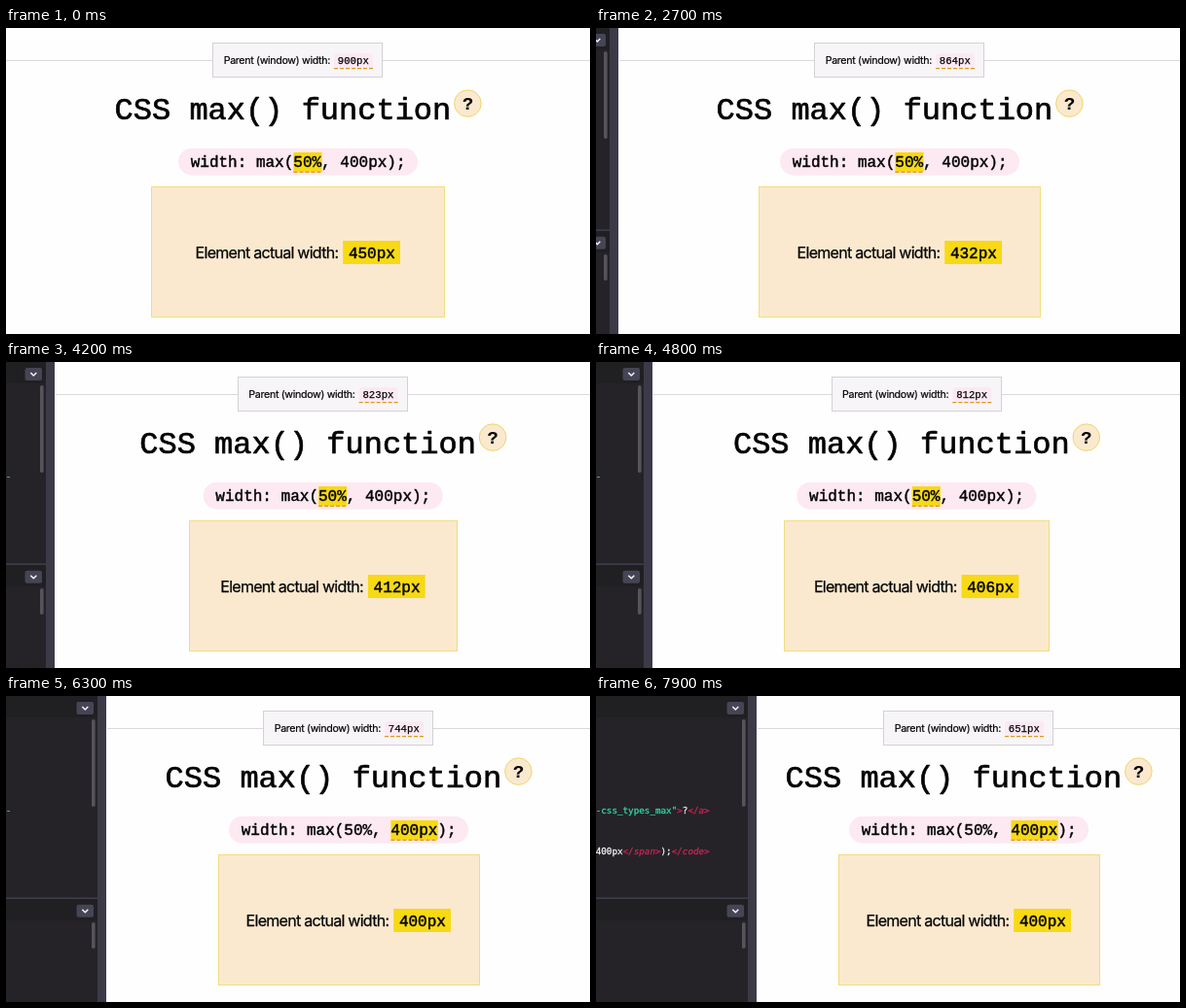
An HTML page with a canvas for the animation above (8 s loop, 600 by 315 pixels).

```html
<!DOCTYPE html>
<html lang="en">
<head>
<meta charset="utf-8">
<title>CSS max() function</title>
<style>
html, body { margin: 0; width: 100%; height: 100%; overflow: hidden; background: #fffeff; }
canvas { display: block; width: 600px; height: 315px; }
</style>
</head>
<body>
<canvas id="stage"></canvas>
<script>
const W = 600, H = 315, LOOP = 8000, STEP = 100;
const MONO = '"Liberation Mono", monospace';
const SANS = 'Inter, sans-serif';
const CODE = '"DejaVu Sans Mono", monospace';
const INK = '#050505';
const YELLOW = '#f7d914', CREAM = '#fbe9cf', PINK = '#fde9f2', DASH = '#d99a1c';
const PANEL = '#252327', HEADER = '#201f22', GUTTER = '#3d3a48', THUMB = '#56545b';
const RED = '#cc2453', GREEN = '#2fd8a0', WHITE = '#f2f2f4';

// Parent width in CSS pixels while the splitter is dragged: [time, width]
const drag = [
  [1300, 900], [2200, 874], [2700, 864], [3100, 850], [3600, 840],
  [4000, 827], [4800, 812], [4900, 808], [5700, 775], [5800, 768],
  [6700, 724], [6900, 713], [7600, 670], [7900, 651]
];

const canvas = document.getElementById('stage');
const ctx = canvas.getContext('2d');
const dpr = window.devicePixelRatio || 1;
canvas.width = W * dpr;
canvas.height = H * dpr;

function parentWidth(t) {
  if (t <= drag[0][0]) return drag[0][1];
  for (let i = 1; i < drag.length; i++) {
    const [t0, w0] = drag[i - 1], [t1, w1] = drag[i];
    if (t <= t1) return Math.round(w0 + (w1 - w0) * (t - t0) / (t1 - t0));
  }
  return drag[drag.length - 1][1];
}

function rect(x, y, w, h, fill) {
  ctx.fillStyle = fill;
  ctx.fillRect(x, y, w, h);
}

function framed(x, y, w, h, fill, edge) {
  x = Math.round(x);
  w = Math.round(w);
  rect(x, y, w, h, edge);
  rect(x + 1, y + 1, w - 2, h - 2, fill);
}

function round(x, y, w, h, r, fill) {
  ctx.fillStyle = fill;
  ctx.beginPath();
  ctx.roundRect(x, y, w, h, r);
  ctx.fill();
}

// weight: extra outline that thickens the strokes
function text(str, x, y, font, weight, fill = INK, spacing = 0) {
  ctx.font = font;
  ctx.letterSpacing = spacing + 'px';
  ctx.fillStyle = ctx.strokeStyle = fill;
  ctx.lineWidth = weight;
  ctx.lineJoin = 'round';
  ctx.fillText(str, x, y);
  ctx.strokeText(str, x, y);
  ctx.letterSpacing = '0px';
}

function dashes(x, y, w) {
  ctx.strokeStyle = DASH;
  ctx.lineWidth = 1.33;
  ctx.setLineDash([4, 2]);
  ctx.beginPath();
  ctx.moveTo(x, y);
  ctx.lineTo(x + w, y);
  ctx.stroke();
  ctx.setLineDash([]);
}

function page(width, edge) {
  const mid = 300 + edge / 2;
  const at = x => mid - 300 + x;
  const actual = Math.max(width / 2, 400);

  rect(edge, 33, W - edge, 1, '#dad8db');
  framed(at(212.4), 15, 175.2, 36, '#f7f5f8', '#d3d1d5');
  text('Parent (window) width:', at(223.7), 37.2, '10.67px ' + SANS, 0.2, INK, -0.32);
  round(at(337), 26, 40, 15.5, 4, PINK);
  text(width + 'px', at(340.8), 37.1, '10.67px ' + MONO, 0.25);
  dashes(at(337), 41.7, 40);

  text('CSS max() function', at(111.6), 94, '32px ' + MONO, 0.7);
  ctx.beginPath();
  ctx.arc(at(474.4), 77.6, 13.8, 0, Math.PI * 2);
  ctx.fillStyle = CREAM;
  ctx.fill();
  ctx.strokeStyle = '#efd668';
  ctx.lineWidth = 1;
  ctx.stroke();
  text('?', at(468.9), 84, 'bold 18.6px ' + MONO, 0.1);

  round(at(177), 123.7, 246, 28, 14, PINK);
  const [first, count] = width > 800 ? [11, 3] : [16, 5];
  const markX = at(189.8) + first * 9.6;
  rect(markX, 128, count * 9.6 + 0.4, 20.3, YELLOW);
  dashes(markX, 148.4, count * 9.6);
  text('width: max(50%, 400px);', at(189.7), 143.4, '16px ' + MONO, 0.45);

  const boxW = actual / 1.5 + 2;
  framed(mid - boxW / 2, 163, boxW, 135, CREAM, '#efde80');
  text('Element actual width:', at(194.6), 236.8, '16px ' + SANS, 0.25, INK, -0.72);
  rect(at(346.2), 219, 58.8, 24, YELLOW);
  text(Math.round(actual) + 'px', at(351.9), 236.8, '16px ' + MONO, 0.45);
}

function codeLine(y, parts) {
  let x = -0.3;
  for (const [str, fill, style = ''] of parts) {
    text(str, x, y, style + ' 9.25px ' + CODE, 0.3, fill);
    x += str.length * 5.57;
  }
}

function foldButton(edge, y) {
  round(edge - 30.5, y, 17.5, 13, 2, '#464556');
  ctx.strokeStyle = '#f4f4f6';
  ctx.lineWidth = 1.5;
  ctx.beginPath();
  ctx.moveTo(edge - 24.7, y + 5);
  ctx.lineTo(edge - 21.7, y + 8);
  ctx.lineTo(edge - 18.7, y + 5);
  ctx.stroke();
}

function pane(edge, top, thumbY, thumbH) {
  rect(0, top, edge, 22, HEADER);
  foldButton(edge, top + 6);
  round(edge - 15, thumbY, 3.6, thumbH, 1.8, THUMB);
}

function editor(edge) {
  const right = Math.floor(edge - 0.5);
  if (right <= 0) return;
  ctx.save();
  ctx.beginPath();
  ctx.rect(0, 0, right, H);
  ctx.clip();
  rect(0, 0, right, H, PANEL);
  pane(right, 0, 24, 90);
  pane(right, 208.7, 233, 27);
  rect(0, 207.3, right, 1.7, GUTTER);
  rect(right - 9, 0, 9, H, GUTTER);

  // Wrapped code: a chunk returns to its line once there is room for it
  const link = [];
  if (edge >= 35) link.push(['-', GREEN]);
  if (edge >= 126) link.push(['css_types_max"', GREEN], ['>', RED], ['?', WHITE]);
  if (edge >= 156) link.push(['</', RED], ['a', RED, 'italic'], ['>', RED]);
  codeLine(121.3, link);

  const value = [];
  if (edge >= 108) value.push(['400px', WHITE], ['</', RED], ['span', RED, 'italic'], ['>', RED], [');', WHITE]);
  if (edge >= 148) value.push(['</', RED], ['code', RED, 'italic'], ['>', RED]);
  codeLine(163.4, value);
  ctx.restore();
}

function draw(now) {
  const t = Math.floor((now % LOOP) / STEP) * STEP;
  const width = parentWidth(t);
  const edge = (900 - width) / 1.5;
  ctx.setTransform(dpr, 0, 0, dpr, 0, 0);
  rect(0, 0, W, H, '#fffeff');
  page(width, edge);
  editor(edge);
}

let start;
function tick(now) {
  if (start === undefined) start = now;
  draw(Math.max(0, now - start));
  requestAnimationFrame(tick);
}
draw(0);
requestAnimationFrame(tick);
</script>
</body>
</html>
```
